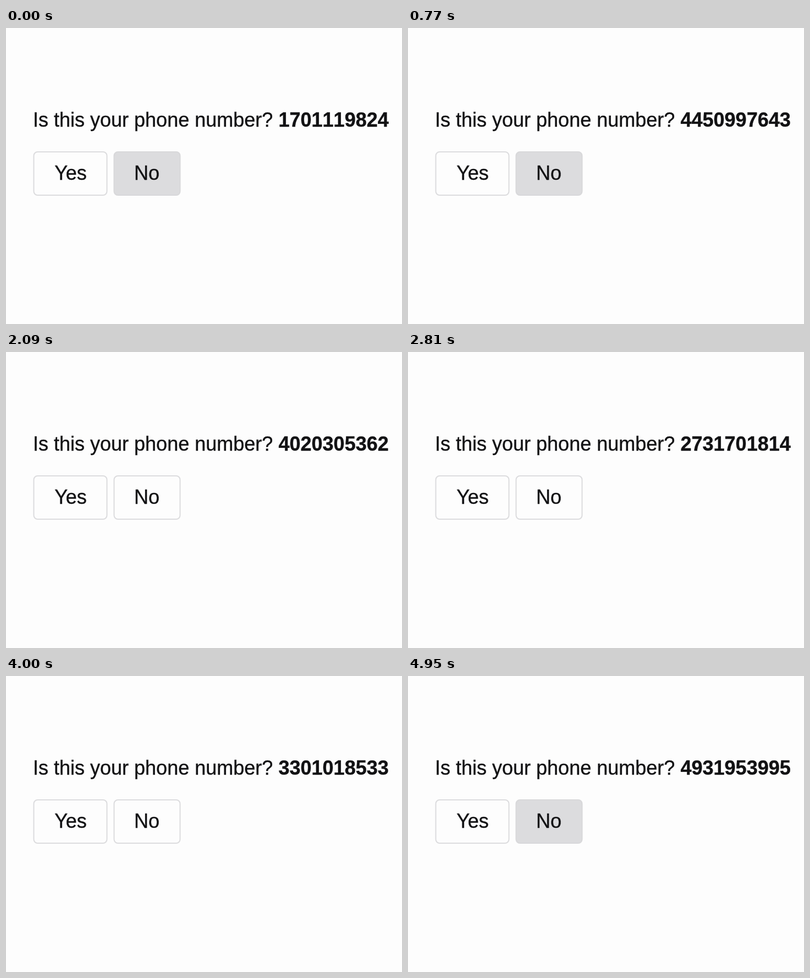
An HTML page that plays this animation: 720 px wide and 540 px high, repeating every 4990 ms.

```html
<!DOCTYPE html>
<html lang="en">
<head>
<meta charset="utf-8">
<title>Phone number prompt</title>
<style>
  html, body { margin: 0; width: 100%; height: 100%; overflow: hidden; background: #fdfdfd; }
  svg { display: block; width: 720px; height: 540px; }
  text {
    font: 36px "Liberation Sans", Arial, sans-serif;
    fill: #121214; stroke: #121214; stroke-width: 0.4;
    white-space: pre;
  }
  #number { font-weight: bold; font-kerning: none; }
  .label { text-anchor: middle; }
  rect { fill: #fdfdfd; stroke: #dcdcde; stroke-width: 2; }
  rect.pressed { fill: #dcdcde; stroke: #d8d8da; }
</style>
</head>
<body>
<svg viewBox="0 0 720 540">
  <text x="49" y="180">Is this your phone number? </text>
  <text id="number" x="495.5" y="180"></text>
  <rect x="50.5" y="226" width="133" height="79" rx="7"/>
  <text class="label" x="117.5" y="277">Yes</text>
  <rect id="no" x="196.5" y="226" width="120" height="79" rx="7"/>
  <text class="label" x="256" y="277">No</text>
</svg>
<script>
  const LOOP = 4990;
  const STEPS = 110;
  const CLICKS = 37;
  const STEP_MS = 1000 / 22;

  const number = document.getElementById("number");
  const no = document.getElementById("no");

  function seeded(seed) {
    return () => {
      seed = (seed * 1664525 + 1013904223) >>> 0;
      return seed / 4294967296;
    };
  }

  // Leading digit 1-5 and fourth digit 0-1 keep the numbers unassigned.
  function phoneNumber(n) {
    const random = seeded((n + 1) * 2654435761 % 4294967296);
    random();
    let digits = "";
    for (let i = 0; i < 10; i++) {
      const r = random();
      digits += i === 0 ? 1 + Math.floor(r * 5) : Math.floor(r * (i === 3 ? 2 : 10));
    }
    return digits;
  }

  // Each click presses the button and brings up a new number.
  function draw(ms) {
    const t = ms % LOOP;
    const step = Math.min(STEPS - 1, Math.floor((t + 5) / STEP_MS));
    const clicks = (step + 1) * CLICKS / STEPS;
    const count = Math.floor(clicks);
    const text = phoneNumber(count);
    if (number.textContent !== text) number.textContent = text;
    no.classList.toggle("pressed", clicks - count < 0.5);
  }

  const start = performance.now();
  function tick() {
    draw(performance.now() - start);
    requestAnimationFrame(tick);
  }
  tick();
</script>
</body>
</html>
```
